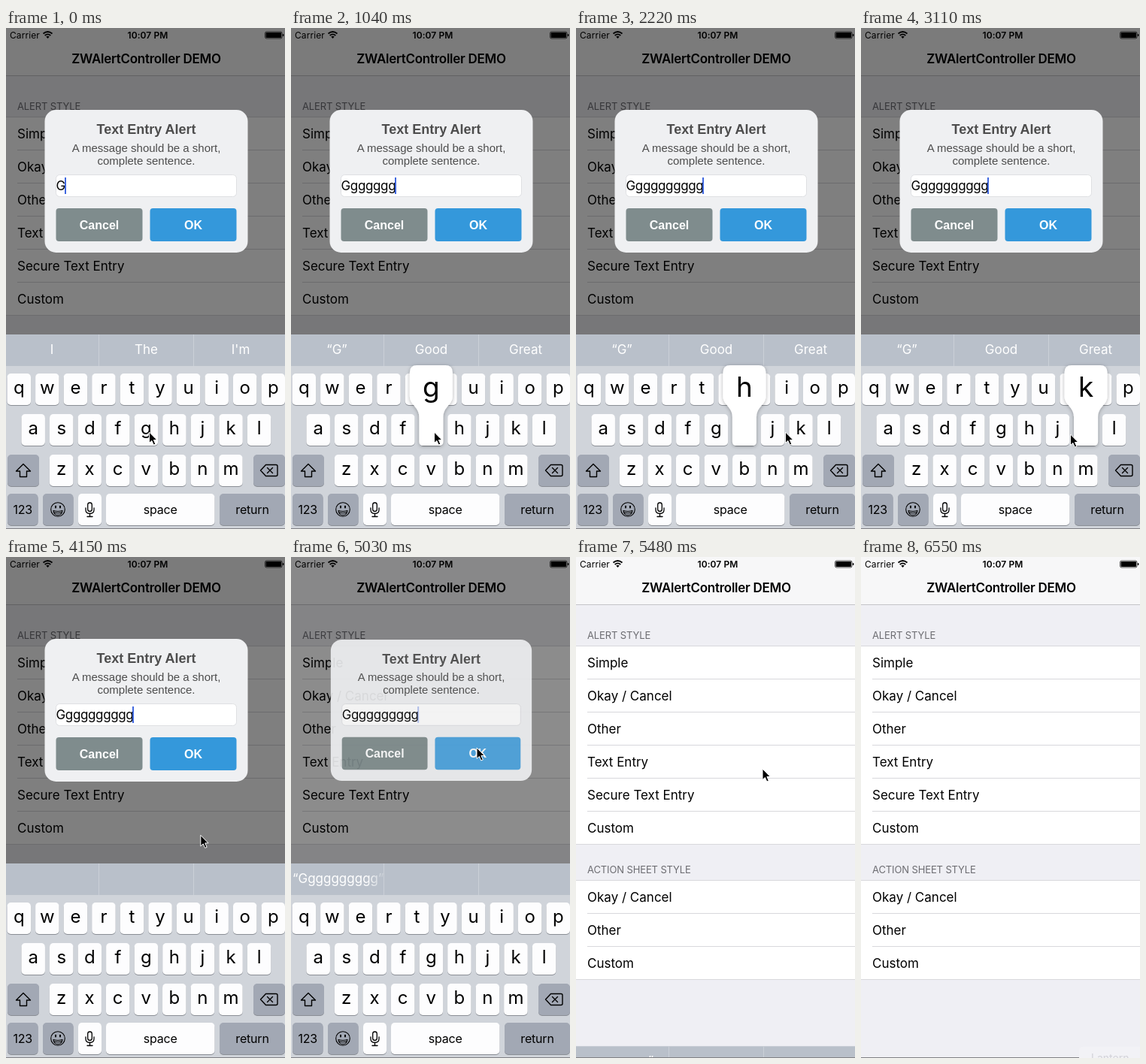
Animation of 371 by 667 pixels, one loop 6650 ms. Source, as an HTML page:

```html
<!DOCTYPE html>
<html lang="en">
<head>
<meta charset="utf-8">
<title>Text entry alert</title>
<style>
html, body { margin: 0; width: 100%; height: 100%; overflow: hidden; background: #efeff4; }
svg { display: block; width: 371px; height: 667px; font-family: Inter, Roboto, sans-serif; }
text { white-space: pre; }
.mid { text-anchor: middle; }
.status { font-size: 12px; letter-spacing: .1px; }
.bold { font-weight: 600; }
.nav { font-size: 17px; font-weight: 600; letter-spacing: -.27px; }
.head { font-size: 13px; fill: #6d6d72; letter-spacing: -.12px; }
.row { font-size: 17px; }
.alert { font-family: "Liberation Sans", Arial, sans-serif; }
.title { font-size: 18px; font-weight: 700; fill: #4d4d4d; }
.msg { font-size: 15px; fill: #4d4d4d; }
.btn { font-size: 16px; font-weight: 700; fill: #fff; }
.field { font-family: Inter, Roboto, sans-serif; font-size: 17px; letter-spacing: -.36px; }
.hint { font-size: 17px; fill: #fff; }
.key { font-size: 24px; }
.fn { font-size: 16px; letter-spacing: -.2px; }
.big { font-size: 37px; }
.icon { fill: none; stroke: #000; stroke-width: 1.4; stroke-linejoin: round; stroke-linecap: round; }
</style>
</head>
<body>
<svg viewBox="0 0 371 667">
  <defs>
    <filter id="soft" x="-30%" y="-20%" width="160%" height="140%">
      <feDropShadow dx="0" dy="1" stdDeviation="2.5" flood-opacity=".3"/>
    </filter>
    <linearGradient id="fade">
      <stop offset=".82" stop-color="#fff"/>
      <stop offset="1" stop-color="#fff" stop-opacity=".2"/>
    </linearGradient>
    <mask id="edge" maskUnits="userSpaceOnUse" x="0" y="408" width="123" height="42">
      <rect y="408" width="123" height="42" fill="url(#fade)"/>
    </mask>
  </defs>

  <g id="page"></g>
  <rect id="dim" width="371" height="667"/>

  <g id="alert" class="alert">
    <rect x="51.5" y="109" width="270" height="190" rx="15" fill="#eff0f2"/>
    <text class="title mid" x="186.5" y="141">Text Entry Alert</text>
    <text class="msg mid" x="186.5" y="165">A message should be a short,</text>
    <text class="msg mid" x="186.5" y="182">complete sentence.</text>
    <rect x="66.5" y="195.5" width="240" height="29" rx="5" fill="#fff" stroke="#dfe0e3"/>
    <text id="typed" class="field" x="66.5" y="216"></text>
    <rect id="caret" y="199" width="2" height="22" fill="#4068e0"/>
    <rect x="66.5" y="240" width="115" height="44" rx="4" fill="#7f8c8d"/>
    <text class="btn mid" x="124" y="268">Cancel</text>
    <rect id="ok" x="191.5" y="240" width="115" height="44" rx="4"/>
    <text class="btn mid" x="249" y="268">OK</text>
  </g>

  <g id="board">
    <rect y="408" width="371" height="259" fill="#d0d4da"/>
    <rect y="408" width="371" height="42" fill="#b9c0ca"/>
    <path d="M123.5 408v42M249.5 408v42" stroke="#cbd0d7"/>
    <g id="hints">
      <text class="hint mid" x="61" y="433.5"></text>
      <text class="hint mid" x="186.5" y="433.5"></text>
      <text class="hint mid" x="312" y="433.5"></text>
    </g>
    <text id="long" class="hint" x="2" y="433.5" mask="url(#edge)">“Gggggggggg”</text>
    <g id="keys"></g>
    <g class="icon">
      <path d="M23 580.5l9.5 9.5h-5v7.5h-9v-7.5h-5z"/>
      <path d="M345.5 581.5h13.5q2 0 2 2v11q0 2-2 2h-13.5l-7-7.5zM347.5 585.5l7 7m0-7l-7 7"/>
      <g stroke-width="1.1">
        <circle cx="69" cy="641" r="9.3"/>
        <path d="M63 642.5q6 2 12 0q-.5 6-6 6t-6-6zM64 645q5 1.5 10 0"/>
        <path d="M66 636.8v1.6M72 636.8v1.6" stroke-width="2"/>
      </g>
      <path d="M106 639v2.5q0 5 5.5 5t5.5-5v-2.5M111.5 646.5v4M108 650.5h7" stroke-width="1.3"/>
      <rect x="108.7" y="632" width="5.6" height="11.5" rx="2.8" stroke-width="1.3"/>
    </g>
    <g id="popup">
      <path filter="url(#soft)" fill="#fff" d="M-19 449H19Q28.5 449 28.5 458.5V490C28.5 502 16 504 16 518V551Q16 556 11 556H-11Q-16 556-16 551V518C-16 504-28.5 502-28.5 490V458.5Q-28.5 449-19 449Z"/>
      <text class="big mid" y="491"></text>
    </g>
  </g>

  <rect y="666" width="371" height="1" fill="#808084"/>
  <g id="tip">
    <rect x="290" y="652" width="90" height="24" rx="5" fill="#f2f2f6"/>
    <text x="306" y="672" font-size="14" fill="#d2d2d8">Lantern</text>
  </g>
  <path id="cursor" d="M0 0V14.5L3.4 11.5L5.8 17L8.3 16L5.9 10.5H10.3Z" stroke="#fff" stroke-width="1"/>
</svg>

<script>
const LOOP = 6650, STEP = 148;
const $ = id => document.getElementById(id);
const text = (cls, x, y, s) => `<text class="${cls}" x="${x}" y="${y}">${s}</text>`;
const box = (x, y, w, h, fill, r = 0) =>
  `<rect x="${x}" y="${y}" width="${w}" height="${h}" rx="${r}" fill="${fill}"/>`;

function section(top, title, rows) {
  const end = top + rows.length * 44;
  let out = text('head', 15, top - 10.5, title) + box(0, top, 371, end - top, '#fff');
  rows.forEach((row, i) => {
    const y = top + i * 44;
    out += box(i ? 15 : 0, y - 1, 371, 1, '#d8d8dc') + text('row', 15, y + 27.5, row);
  });
  return out + box(0, end - 1, 371, 1, '#d8d8dc');
}

$('page').innerHTML =
  box(0, 0, 371, 667, '#efeff4') + box(0, 0, 371, 63, '#f7f7f8') + box(0, 63, 371, 1, '#c4c4c8') +
  text('status', 5, 13.5, 'Carrier') + text('status bold mid', 188.5, 13.5, '10:07 PM') +
  `<g fill="none" stroke="#000" stroke-width="1.8">
     <path d="M49.5 7.5Q55.5 2.5 61.5 7.5M51.7 10Q55.5 6.8 59.3 10"/></g>
   <path d="M53.3 11.6Q55.5 9.8 57.7 11.6L55.5 14Z"/>` +
  `<rect x="344.5" y="5" width="22.5" height="9" rx="2" fill="none" stroke="#000" stroke-width=".7"/>` +
  box(345.5, 6, 20.5, 7, '#000', 1) + box(367.8, 8, 1.6, 3, '#000', .8) +
  text('nav mid', 186.5, 47, 'ZWAlertController DEMO') +
  section(119, 'ALERT STYLE',
    ['Simple', 'Okay / Cancel', 'Other', 'Text Entry', 'Secure Text Entry', 'Custom']) +
  section(431, 'ACTION SHEET STYLE', ['Okay / Cancel', 'Other', 'Custom']);

const keyX = {};
function key(x, y, w, label = '', cls = 'key', fill = '#fdfdfe') {
  return box(x, y + 1, w, 42, '#8a8e95', 5) + box(x, y, w, 42, fill, 5) +
    text(cls + ' mid', x + w / 2, y + (cls === 'key' ? 27 : 26.5), label);
}
function letters(s, first, y) {
  return [...s].map((c, i) => {
    keyX[c] = first + i * 37.55;
    return key(keyX[c] - 15.75, y, 31.5, c);
  }).join('');
}
const GRAY = '#a2a8b4';
$('keys').innerHTML =
  letters('qwertyuiop', 17.3, 460) + letters('asdfghjkl', 36.2, 514) + letters('zxcvbnm', 73.6, 568) +
  key(2, 568, 42, '', 'fn', GRAY) + key(329, 568, 42, '', 'fn', GRAY) +
  key(2, 620, 40.5, '123', 'fn', GRAY) + key(49, 620, 40.5, '', 'fn', GRAY) +
  key(96, 620, 31, '', 'fn') + key(133, 620, 144.5, 'space', 'fn') + key(284, 620, 87, 'return', 'fn', GRAY);

// Each track lists [step, values...] and is linear in between.
const PATH = [[0, 190.5, 538], [12, 190.5, 538], [15, 278.5, 538], [17, 286, 540], [18, 286, 540],
  [20, 277, 540], [21, 278.5, 541], [23, 278.5, 541], [31, 247, 268], [32, 247, 254], [35, 247, 254],
  [37, 248, 282], [39, 292, 496], [42, 332, 640], [43, 345, 680]];
const FADE = [[33, 0], [34, .1], [35, .93], [36, 1]];
const SLIDE = [[35, 0], [36, .6], [37, .94], [38, 1]];
const POPUPS = [[1, 'g'], [14, 'h'], [16, 'j'], [17, 'k'], [19, 'j'], [21, 'k'], [24, '']];
const HINTS = [[0, ['I', 'The', 'I\'m']], [1, ['“G”', 'Good', 'Great']], [26, ['', '', '']],
  [36, ['…gggggg”', '', '']]];

function at(track, n) {
  const i = track.findIndex(p => p[0] > n);
  if (i < 0) return track[track.length - 1].slice(1);
  if (!i) return track[0].slice(1);
  const a = track[i - 1], b = track[i], k = (n - a[0]) / (b[0] - a[0]);
  return a.slice(1).map((v, j) => v + (b[j + 1] - v) * k);
}
const latest = (list, n) => list.reduce((v, [from, next]) => n >= from ? next : v, '');
const show = (el, on) => el.setAttribute('visibility', on ? 'visible' : 'hidden');

function draw(n) {
  const count = Math.max(0, Math.min(9, n - 1));
  $('typed').textContent = 'G' + 'g'.repeat(count);
  $('caret').setAttribute('x', 78 + count * 10);
  $('caret').setAttribute('opacity', n >= 33 ? .4 : 1);
  $('ok').setAttribute('fill', n >= 32 ? '#4aa3df' : '#3498db');

  const [gone] = at(FADE, n), scale = 1 - .1 * gone;
  $('dim').setAttribute('opacity', .5 * (1 - gone));
  $('alert').setAttribute('opacity', 1 - gone);
  $('alert').setAttribute('transform', `translate(186.5 204) scale(${scale}) translate(-186.5 -204)`);
  $('board').setAttribute('transform', `translate(0 ${259 * at(SLIDE, n)[0]})`);

  const hints = latest(HINTS, n);
  [...$('hints').children].forEach((el, i) => el.textContent = hints[i]);
  show($('long'), n >= 33 && n < 36);

  const letter = latest(POPUPS, n), popup = $('popup');
  show(popup, letter);
  if (letter) {
    popup.setAttribute('transform', `translate(${keyX[letter]} 0)`);
    popup.lastElementChild.textContent = letter;
  }
  const [x, y] = at(PATH, n);
  $('cursor').setAttribute('transform', `translate(${x} ${y})`);
  show($('tip'), n >= 43);
}

const start = performance.now();
function tick() {
  const t = (performance.now() - start) % LOOP;
  draw(Math.min(44, Math.floor((t + 6) / STEP)));
  requestAnimationFrame(tick);
}
tick();
</script>
</body>
</html>
```
